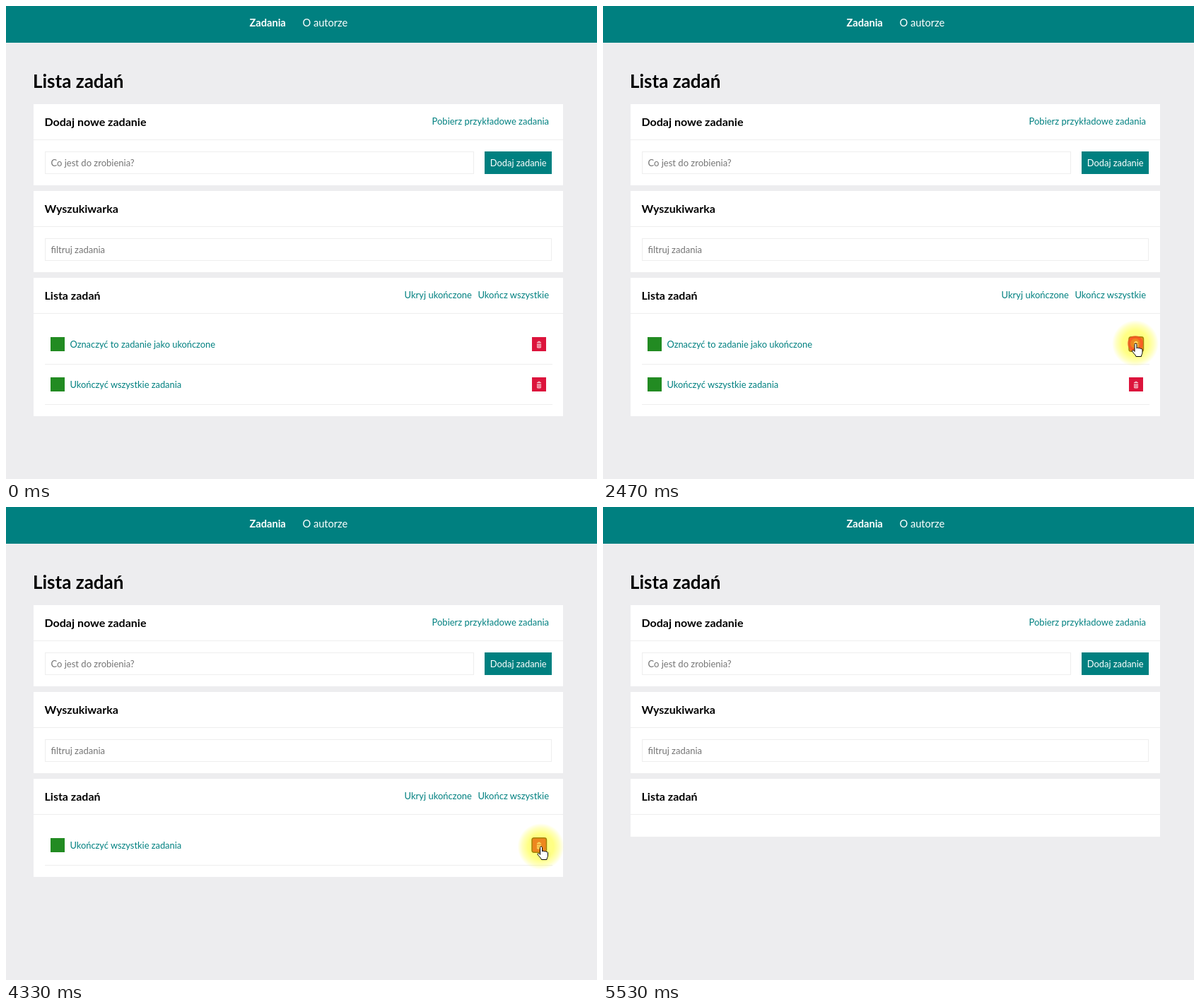
Write an HTML page that moves like this. It is 836 px wide and 670 px high and loops after 5590 ms.

```html
<!DOCTYPE html>
<html lang="pl">
<head>
<meta charset="utf-8">
<title>Lista zadań</title>
<style>
  html, body { margin: 0; width: 100%; height: 100%; overflow: hidden; background: #ededef; }
  svg { display: block; font: 13px Lato, sans-serif; }
  .panel { fill: #fff; }
  .line { fill: #eee; }
  .field { fill: #fff; stroke: #eee; }
  .teal, .link { fill: teal; }
  .link.end { text-anchor: end; }
  .task { font-size: 12.85px; }
  .hint { fill: #757575; }
  .white { fill: #fff; }
  .nav { font-size: 14.6px; }
  h1, .h1 { font-size: 26px; font-weight: 700; }
  .h2 { font-size: 16px; font-weight: 700; }
  .bold { font-weight: 700; }
  .outline { fill: none; stroke: #501010; stroke-width: 1.5; }
  .pointer path { fill: #fff; stroke: #000; stroke-linejoin: round; }
</style>
</head>
<body>
<svg width="836" height="670" viewBox="0 0 836 670">
  <defs>
    <radialGradient id="halo">
      <stop offset="0" stop-color="#ff0" stop-opacity=".5"/>
      <stop offset=".55" stop-color="#ff0" stop-opacity=".48"/>
      <stop offset=".8" stop-color="#ff0" stop-opacity=".25"/>
      <stop offset="1" stop-color="#ff0" stop-opacity="0"/>
    </radialGradient>
    <g id="controls">
      <rect x="63" y="469" width="20" height="20" fill="#228b22"/>
      <rect x="744" y="469" width="20" height="20" fill="#dc143c"/>
      <path d="M751 476.5h6M752.5 475.3h3M751.7 478v6h4.6v-6M753.2 478v5.5M754.8 478v5.5"
            fill="none" stroke="#fff" stroke-width=".9" opacity=".9"/>
      <rect class="line" x="55" y="507" width="718" height="1"/>
    </g>
  </defs>

  <rect width="836" height="670" fill="#ededef"/>
  <rect class="teal" width="836" height="52"/>
  <text class="nav white bold" x="344.5" y="29">Zadania</text>
  <text class="nav white" x="419.5" y="29">O autorze</text>
  <text class="h1" x="38" y="116">Lista zadań</text>

  <rect class="panel" x="39" y="139" width="749" height="115"/>
  <rect class="line" x="39" y="189" width="749" height="1"/>
  <text class="h2" x="54.5" y="170">Dodaj nowe zadanie</text>
  <text class="link end" x="768" y="168">Pobierz przykładowe zadania</text>
  <rect class="field" x="55.5" y="206.5" width="606" height="31"/>
  <text class="hint" x="63.5" y="227">Co jest do zrobienia?</text>
  <rect class="teal" x="677" y="206" width="95" height="32"/>
  <text class="white task" x="724.7" y="227" text-anchor="middle">Dodaj zadanie</text>

  <rect class="panel" x="39" y="262" width="749" height="115"/>
  <rect class="line" x="39" y="312" width="749" height="1"/>
  <text class="h2" x="54.5" y="293">Wyszukiwarka</text>
  <rect class="field" x="55.5" y="329.5" width="716" height="31"/>
  <text class="hint" x="63.5" y="350">filtruj zadania</text>

  <rect class="panel" id="list" x="39" y="385" width="749" height="196"/>
  <rect class="line" x="39" y="435" width="749" height="1"/>
  <text class="h2" x="54.5" y="416">Lista zadań</text>
  <g id="actions">
    <text class="link end" x="659" y="414">Ukryj ukończone</text>
    <text class="link end" x="768" y="414">Ukończ wszystkie</text>
  </g>
  <g id="first">
    <use href="#controls"/>
    <text class="link task" x="90.5" y="484">Oznaczyć to zadanie jako ukończone</text>
  </g>
  <g id="second">
    <use href="#controls"/>
    <text class="link task" x="90.5" y="484">Ukończyć wszystkie zadania</text>
  </g>
  <rect class="outline" id="focus" x="744" y="468.7" width="20.5" height="20.5" rx="3"/>

  <g class="pointer" id="pointer">
    <circle r="33" fill="url(#halo)"/>
    <circle id="ring" fill="none" stroke="#ff4628" stroke-width="4"/>
    <path id="arrow" d="M.5 .5v14l3.3-3 2 4.8 2-.9-2-4.6h4.3z"/>
    <path id="hand" d="M-1 1.5c0-2 3-2 3 0v5.5c.3-1.2 2.7-1.2 3 .2c.5-1 2.5-.8 2.7.5c.8-.6 2.3-.2 2.3 1.2v4c0 2-1.6 3.5-1.6 5.6h-7.4c0-1.8-5-6-5.4-7.5c-.4-1.6 1.8-2 2.6-.6l.8 1z"/>
  </g>
</svg>
<script>
  const LOOP = 5590, TICK = 200 / 3, ROW = 57;
  const CLICKS = [34, 65], HIT = 4;

  // tick, x, y of the pointer
  const PATH = [
    [18, 791, 621], [20, 753, 593], [22, 692, 553], [23, 669, 539],
    [24, 660, 530], [25, 674, 525], [26, 703, 521], [27, 715, 514],
    [29, 738, 494], [31, 751, 481], [32, 753, 478], [48, 753, 478],
    [49, 754, 482], [51, 757, 502], [53, 758, 516], [54, 758, 516],
    [55, 757, 505], [57, 757, 490], [60, 756.5, 481], [74, 756.5, 481],
    [75, 756, 485], [78, 752, 532], [82, 746, 690]
  ];
  const RING = [[0, 0], [2, .7], [5, .65], [9, .6], [15.5, .47], [19, .32], [21, .16]];

  const el = id => document.getElementById(id);
  const [list, actions, first, second, focus, pointer, ring, arrow, hand] =
    ['list', 'actions', 'first', 'second', 'focus', 'pointer', 'ring', 'arrow', 'hand'].map(el);
  const show = (node, on) => { node.style.display = on ? '' : 'none'; };

  function locate(k) {
    const i = PATH.findIndex(p => p[0] >= k);
    if (i < 0 || k < PATH[0][0]) return null;
    const b = PATH[i], a = PATH[Math.max(i - 1, 0)];
    const f = b[0] > a[0] ? (k - a[0]) / (b[0] - a[0]) : 0;
    return [a[1] + (b[1] - a[1]) * f, a[2] + (b[2] - a[2]) * f];
  }

  function draw(time) {
    const k = Math.floor((time % LOOP + 3.4) / TICK);
    const done = CLICKS.filter(c => k >= c + HIT).length;

    list.setAttribute('height', 82 + ROW * (2 - done));
    show(actions, done < 2);
    show(first, done < 1);
    show(second, done < 2);
    second.setAttribute('transform', `translate(0 ${done ? 0 : ROW})`);
    show(focus, CLICKS.some(c => k >= c && k < c + HIT));

    const pos = locate(k);
    show(pointer, pos);
    if (!pos) return;
    const [x, y] = pos;
    pointer.setAttribute('transform', `translate(${x} ${y})`);
    const over = k < 75 && x >= 744 && x <= 765 && y >= 469 && y <= 490;
    show(hand, over);
    show(arrow, !over);

    const click = CLICKS.find(c => k > c && k < c + RING.length);
    show(ring, click);
    if (click) {
      const [r, alpha] = RING[k - click];
      ring.setAttribute('r', r);
      ring.setAttribute('stroke-opacity', alpha);
    }
  }

  const start = performance.now();
  function frame() {
    draw(performance.now() - start);
    requestAnimationFrame(frame);
  }
  frame();
</script>
</body>
</html>
```
